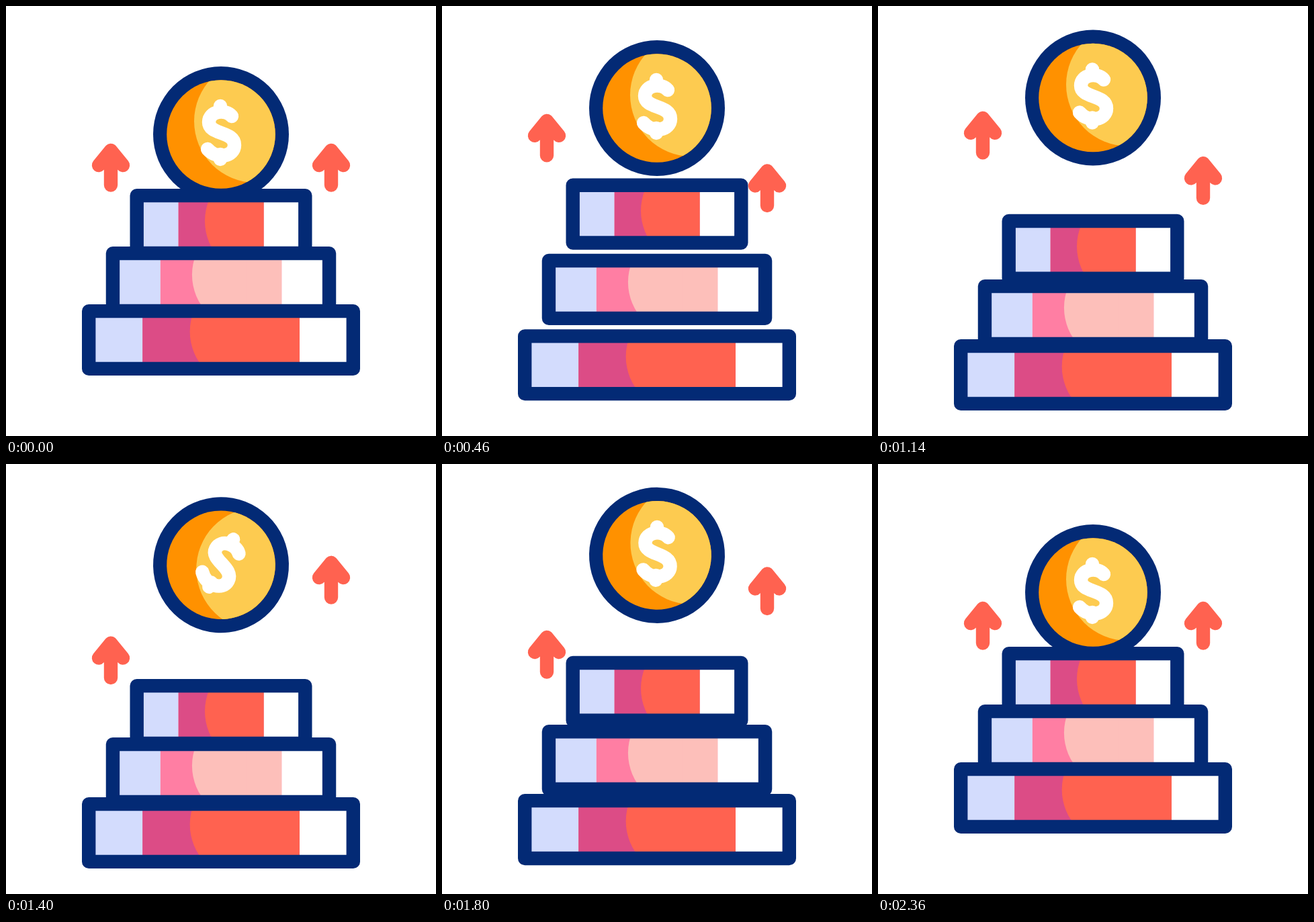
Write an HTML page with a canvas that moves like this. It is 640x640 px and loops after 2400 ms.

```html
<!DOCTYPE html>
<html lang="en">
<head>
<meta charset="utf-8">
<title>Growing stack</title>
<style>
html, body { margin: 0; width: 100%; height: 100%; overflow: hidden; background: #fff; }
canvas { display: block; }
</style>
</head>
<body>
<canvas id="stage" width="640" height="640"></canvas>
<script>
const c = document.getElementById('stage').getContext('2d');
const NAVY = '#032a75', RED = '#ff6250', LAVENDER = '#d3dcfd';

// Moments of the story, in ms
const LOOP = 2400, START = 200, SPREAD = 603, LAND = 1550, SECOND_LAND = 2014, END = 2360;
const SPREAD_COIN = -54.5, PACKED = 48;

const smooth = p => p * p * (3 - 2 * p);
const fall = p => p * p;
const drop = p => p * p * p;
const rise = p => 1 - (1 - p) * (1 - p);

// Keys are [time, value, easing towards this key]
function track(t, ...keys) {
  let [t0, v0] = keys[0];
  for (const [t1, v1, ease = smooth] of keys) {
    if (t < t1) return t < t0 ? v0 : v0 + (v1 - v0) * ease((t - t0) / (t1 - t0));
    [t0, v0] = [t1, v1];
  }
  return v0;
}

const dollar = new Path2D('M16-27C7-38-18-35-18-18C-18 1 20-5 20 16C20 33-6 38-20 22M-1-42V-34M-1 37V30');
const arrow = new Path2D('M-18 237L0 215L18 237M0 215V266.5');

function at(x, y, draw) {
  c.save();
  c.translate(x, y);
  draw();
  c.restore();
}

function circle(x, y, r, color) {
  c.fillStyle = color;
  c.beginPath();
  c.arc(x, y, r, 0, 7);
  c.fill();
}

function clipped(shape, draw) {
  c.save();
  c.beginPath();
  shape();
  c.clip();
  draw();
  c.restore();
}

// Bars are numbered from the top, 0 to 2; upper ones settle later
function barShift(t, i) {
  const spread = -21.5 + 36.8 * i, packed = PACKED + i * i;
  const leave = 860 - 257 * i;
  return track(t, [START, 0], [SPREAD, spread], [leave, spread], [leave + 370, packed],
    [LAND, packed], [1690, -7 + 25.5 * i, rise], [1870, packed, fall],
    [SECOND_LAND, packed], [END, 0]);
}

function drawBar(i) {
  const h = 42.9, x = 194.7 - 35.75 * i, w = 640 - 2 * x;
  const left = 256.5 - 26.7 * i, cut = 640 - left;
  const [dark, light] = i === 1 ? ['#ff7ea3', '#fdbfba'] : ['#dc4c86', RED];
  const arcX = 273 + 23 * 0.17 ** i, arcY = -13 + 8 * 0.25 ** i;
  const band = (from, to, color) => {
    c.fillStyle = color;
    c.fillRect(from, -h, to - from, 2 * h);
  };
  band(x, left, LAVENDER);
  band(cut, x + w, '#fff');
  band(left, cut, dark);
  clipped(() => c.rect(left, -h, cut - left, 2 * h), () => {
    circle(arcX + 82, arcY, 82, light);
    band(arcX + 82, cut, light);
  });
  c.strokeStyle = NAVY;
  c.strokeRect(x, -h, w, 2 * h);
}

function drawCoin(t) {
  const turn = track(t, [1250, 0], [1400, 27], [1640, -23], [1980, 30], [2200, 0]);
  c.rotate(turn * Math.PI / 180);
  circle(0, 0, 101, NAVY);
  circle(0, 0, 80.8, '#ff9100');
  clipped(() => c.arc(0, 0, 80.8, 0, 7), () => circle(51.4, -19.5, 91.4, '#fdcb50'));
  c.strokeStyle = '#fff';
  c.stroke(dollar);
}

function drawArrow(x, t, first, second) {
  const shift = track(t, [START, 0], [850, first], [1530, second], [2170, 0]);
  c.strokeStyle = RED;
  at(x, shift, () => c.stroke(arrow));
}

// Short rays leaving the coin's landing place
function drawSparks(t) {
  if (t < 1965 || t > 2220) return;
  const tip = 1 + track(t, [1980, 0.0001], [2110, 0.21]);
  const tail = 1 + track(t, [2060, 0], [2220, 0.21]);
  c.strokeStyle = RED;
  for (const side of [-1, 1]) {
    for (const [x, y] of [[95, -156], [116, -121]]) {
      c.beginPath();
      c.moveTo(320 + side * x * tail, 239 + y * tail);
      c.lineTo(320 + side * x * tip, 239 + y * tip);
      c.stroke();
    }
  }
}

function frame(t) {
  c.fillStyle = '#fff';
  c.fillRect(0, 0, 640, 640);
  c.lineWidth = 20.4;
  c.lineCap = c.lineJoin = 'round';
  const coinShift = track(t, [START, 0], [SPREAD, SPREAD_COIN], [1245, SPREAD_COIN],
    [LAND, PACKED, drop], [1730, -62, rise], [SECOND_LAND, PACKED, fall], [END, 0]);
  at(320, 191 + coinShift, () => drawCoin(t));
  for (let i = 0; i < 3; i++) at(0, 325 + 86 * i + barShift(t, i), () => drawBar(i));
  drawArrow(156, t, -124.5, 70);
  drawArrow(484, t, 86, -84);
  drawSparks(t);
}

const start = performance.now();
function loop() {
  frame((performance.now() - start) % LOOP);
  requestAnimationFrame(loop);
}
loop();
</script>
</body>
</html>
```
